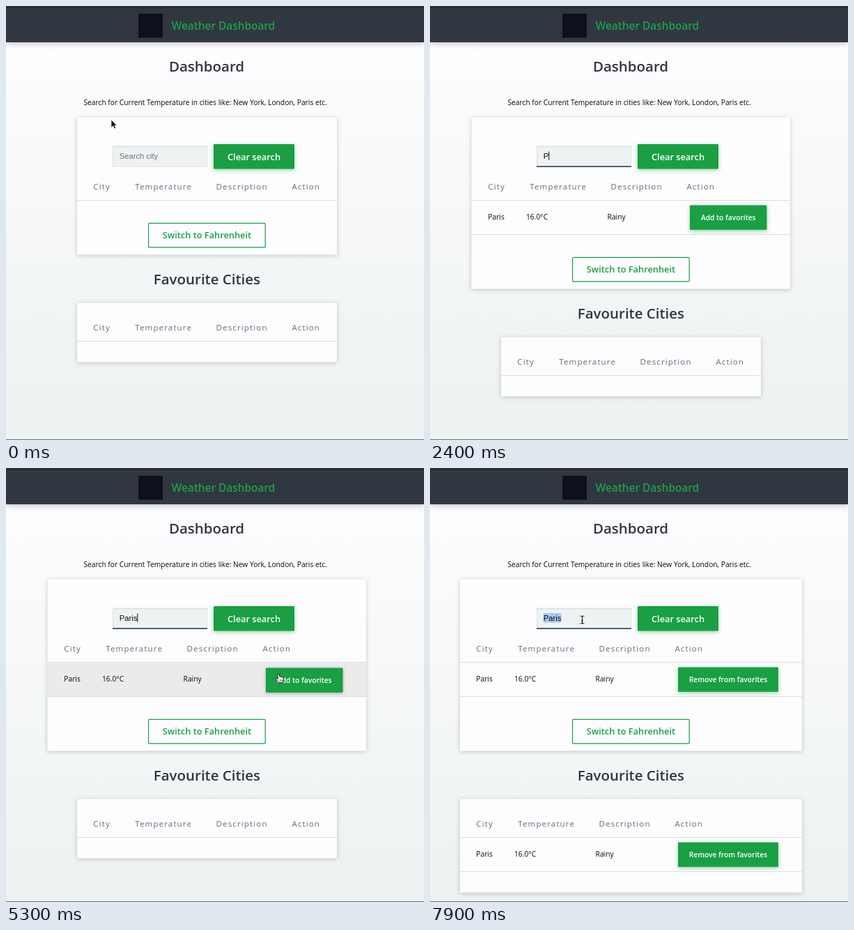
An HTML page that plays this animation: 600 by 622 pixels, repeating every 8 s.

```html
<!DOCTYPE html>
<html lang="en">
<head>
<meta charset="utf-8">
<title>Weather Dashboard</title>
<style>
  html, body { margin: 0; width: 100%; height: 100%; overflow: hidden; }
  svg { display: block; width: 600px; height: 622px; font-family: "Open Sans", sans-serif; cursor: default; }
  .title { font-size: 20.48px; font-weight: 600; fill: #303740; text-anchor: middle; }
  .brand { font-size: 15.36px; font-weight: 600; fill: #1e9f47; }
  .body { font-size: 10.24px; fill: #0a0a0a; }
  .head { font-size: 11.52px; letter-spacing: .1em; fill: #5f7274; }
  .big { font-size: 12.8px; font-weight: 600; text-anchor: middle; }
  .small { font-size: 10.24px; font-weight: 600; fill: #fff; text-anchor: middle; }
  .field { font-family: "Liberation Sans", Arial, sans-serif; font-size: 11.2px; }
  .card { fill: #fdfcfe; filter: drop-shadow(0 1.5px 3px rgba(40, 55, 60, .27)); }
  .bar { fill: #303741; filter: drop-shadow(0 2px 4px rgba(40, 70, 80, .3)); }
  .green { fill: #1a9f43; filter: drop-shadow(0 2.5px 3px rgba(26, 159, 67, .42)); }
  .pressed .green { filter: drop-shadow(0 1px 2px rgba(40, 70, 60, .4)); }
  .rule { fill: #dcdee1; }
  .hover { fill: #ebebec; }
  [hidden] { display: none; }
</style>
</head>
<body>
<svg viewBox="0 0 600 622">
  <defs>
    <linearGradient id="sky" x2="0" y2="1">
      <stop offset=".08" stop-color="#fefdff"/>
      <stop offset="1" stop-color="#ecf1f1"/>
    </linearGradient>
  </defs>
  <rect width="600" height="622" fill="url(#sky)"/>
  <rect class="bar" width="600" height="52"/>
  <rect width="600" height="3" fill="#303134"/>
  <rect y="2" width="600" height="1" fill="#222428"/>
  <rect x="190" y="11" width="35" height="34.5" fill="#0e111b"/>
  <text class="brand" x="237.8" y="34">Weather Dashboard</text>
  <text class="title" x="288" y="94.3">Dashboard</text>
  <text class="body" x="111.5" y="142">Search for Current Temperature in cities like: New York, London, Paris etc.</text>

  <rect class="card" id="card1" y="159.5"/>
  <g id="table1"></g>

  <rect x="153" y="200.5" width="136" height="30" fill="#dfe4e5"/>
  <rect x="154.5" y="202.5" width="133.5" height="27" fill="#eef2f2"/>
  <rect id="underline" x="153" y="229.3" width="136" height="1.5" fill="#26334f"/>
  <rect id="selection" x="162.8" y="208" width="25.6" height="13.5" fill="#a6c9ef"/>
  <text class="field" id="query" x="162.8" y="218.6"></text>
  <rect id="caret" y="208.5" width="1" height="12.5" fill="#111"/>

  <rect class="green" x="298" y="198" width="116" height="35.5" rx="1.3"/>
  <text class="big" x="356" y="220.5" fill="#fff">Clear search</text>

  <g id="lower">
    <rect x="204.6" y="311.4" width="167.6" height="34.4" rx="1.3" fill="#fdfcfe" stroke="#1a9f43" stroke-width="1.2"/>
    <text class="big" x="288.4" y="333.3" fill="#1a9f43">Switch to Fahrenheit</text>
    <text class="title" x="288.4" y="399">Favourite Cities</text>
    <rect class="card" id="card2" y="425.5"/>
    <g id="table2"></g>
  </g>
  <rect y="621" width="600" height="1" fill="#66696c"/>

  <g id="pointer">
    <path id="arrow" d="M0 0V11.2L2.7 8.8L4.6 12.9L6.5 12.1L4.7 8.1H8.2Z" fill="#000" stroke="#fff" stroke-width=".8"/>
    <g id="beam" fill="none">
      <path d="M-3 -5.5Q0 -5.5 0 -4Q0 -5.5 3 -5.5M0 -4.5V4.5M-3 5.5Q0 5.5 0 4Q0 5.5 3 5.5M-1.5 1.5H1.5" stroke="#fff" stroke-width="2.2" opacity=".7"/>
      <path d="M-3 -5.5Q0 -5.5 0 -4Q0 -5.5 3 -5.5M0 -4.5V4.5M-3 5.5Q0 5.5 0 4Q0 5.5 3 5.5M-1.5 1.5H1.5" stroke="#111" stroke-width="1.1"/>
    </g>
    <g id="hand" stroke="#111" stroke-width=".9" stroke-linejoin="round">
      <path d="M-1.3 .8Q-1 -.7 .4 0L2 4.2Q3.3 3.2 4 4.4Q5.2 3.6 5.8 5Q7.3 4.6 7.4 6.4Q7.7 9 6.7 10.5V12.6H.5Q-.6 10.4 -2.7 8.3Q-4.3 6.4 -2.6 6.1L-.3 7.3Z" fill="#fff"/>
      <path d="M2 8V10.8M3.7 8V10.8M5.3 8V10.8" fill="none" stroke-width=".6"/>
    </g>
  </g>
</svg>
<script>
  const LOOP = 8000, STEP = 100;
  const RESULT = 2300, SAVED = 6500;
  const $ = id => document.getElementById(id);
  const show = (el, on) => el.toggleAttribute('hidden', !on);
  const set = (el, attrs) => { for (const k in attrs) el.setAttribute(k, attrs[k]); };

  // Pointer stops: time, x, y
  const stops = [
    [0, 151, 163], [200, 151, 163], [800, 184, 214], [4200, 184, 214],
    [4600, 290.5, 231.5], [5000, 352, 274], [5400, 398, 299], [6500, 398, 299],
    [6700, 324.5, 415], [6800, 324, 412], [7200, 222, 222], [7400, 218.5, 217.5], [8000, 218.5, 217.5]
  ];
  const keys = [RESULT, 2500, 2700, 2850, 3100];

  // Origin of each table is its header rule; columns are shifted as a whole by state.
  const buildTable = (el, y) => {
    const heads = [['City', 83.3], ['Temperature', 143.2], ['Description', 259.5], ['Action', 368.4]];
    const cells = [['Paris', 83.3], ['16.0°C', 138], ['Rainy', 254.6]];
    const words = (list, cls, dy) =>
      list.map(([s, x]) => `<text class="${cls}" x="${x}" y="${dy}">${s}</text>`).join('');
    set(el, { transform: `translate(0 ${y})` });
    el.innerHTML = `
      <rect class="hover wide" y=".5" height="48.5"/>
      <rect class="rule wide" height="1"/>
      <g class="cols">${words(heads, 'head', -14.8)}
        <g class="row">${words(cells, 'body', 28.4)}
          <g class="action"><rect class="green" x="373" y="7.5" height="35.3" rx="1.3"/>
          <text class="small" y="28.6"></text></g>
        </g>
      </g>
      <rect class="rule wide row" y="49" height="1"/>`;
  };

  const layoutTable = (n, state, filled, hovered, pressed) => {
    const [x, w, dx] = [[102, 373, 42], [59.5, 457.5, 0], [43, 491, -17]][state];
    const table = $('table' + n), find = s => table.querySelector(s);
    const empty = n === 1 ? 197 : 85;
    set($('card' + n), { x, width: w, height: empty + (filled ? 49 : 0) });
    table.querySelectorAll('.wide').forEach(r => set(r, { x, width: w }));
    table.querySelectorAll('.row').forEach(r => show(r, filled));
    set(find('.cols'), { transform: `translate(${dx} 0)` });
    show(find('.hover'), hovered);
    const bw = state === 2 ? 144 : 110.5;
    set(find('.green'), { width: bw });
    set(find('.small'), { x: 373 + bw / 2 });
    find('.small').textContent = state === 2 ? 'Remove from favorites' : 'Add to favorites';
    const action = find('.action');
    action.classList.toggle('pressed', pressed);
    set(action, { transform: `translate(0 ${pressed ? 1 : 0})` });
  };

  const pointerAt = t => {
    const i = Math.max(1, stops.findIndex(s => s[0] > t));
    const [t0, x0, y0] = stops[i - 1], [t1, x1, y1] = stops[i];
    const u = (t - t0) / (t1 - t0), e = u * u * (3 - 2 * u);
    return [x0 + (x1 - x0) * e, y0 + (y1 - y0) * e];
  };

  const focusAt = t => {
    if (t < 1000) return 0;
    if (t <= 6300) return 1;
    if (t < 7500) return Math.max(0, 1 - (t - 6300) / 300);
    return 1;
  };

  const within = (x, y, l, t, r, b) => x >= l && x <= r && y >= t && y <= b;

  const render = t => {
    const state = t < RESULT ? 0 : t < SAVED ? 1 : 2;
    const [px, py] = pointerAt(t);
    const visible = t < RESULT || t >= 4200;
    const onRow = state > 0 && visible && within(px, py, 43, 279, 534, 327);
    const onAction = onRow && (state === 1 ? within(px, py, 373, 286, 483, 321) : within(px, py, 356, 286, 500, 321));
    const onField = within(px, py, 153, 200, 289, 231);
    const onButton = onAction || within(px, py, 298, 198, 414, 233) ||
      (state > 0 && within(px, py, 204, 360, 372, 395));

    layoutTable(1, state, state > 0, onRow, onAction);
    layoutTable(2, state === 2 ? 2 : 0, state === 2, false, false);
    set($('lower'), { transform: `translate(0 ${state ? 49 : 0})` });

    const count = keys.filter(k => k <= t).length;
    $('query').textContent = count ? 'Paris'.slice(0, count) : 'Search city';
    set($('query'), { fill: count ? '#0a0a0a' : '#697073' });
    set($('underline'), { opacity: focusAt(t) });
    show($('selection'), t >= 7600);

    const since = t - (count ? keys[count - 1] : 1000);
    const caretX = 162.8 + (count ? $('query').getComputedTextLength() : 0);
    set($('caret'), { x: caretX });
    show($('caret'), t >= 1000 && t < 6300 && since % 1000 < 500);

    set($('pointer'), { transform: `translate(${px} ${py})` });
    show($('pointer'), visible);
    show($('beam'), onField);
    show($('hand'), onButton && !onField);
    show($('arrow'), !onField && !onButton);
  };

  buildTable($('table1'), 278);
  buildTable($('table2'), 480);
  const start = performance.now();
  const tick = () => {
    const t = (performance.now() - start) % LOOP;
    render(Math.floor(t / STEP) * STEP);
    requestAnimationFrame(tick);
  };
  tick();
</script>
</body>
</html>
```
